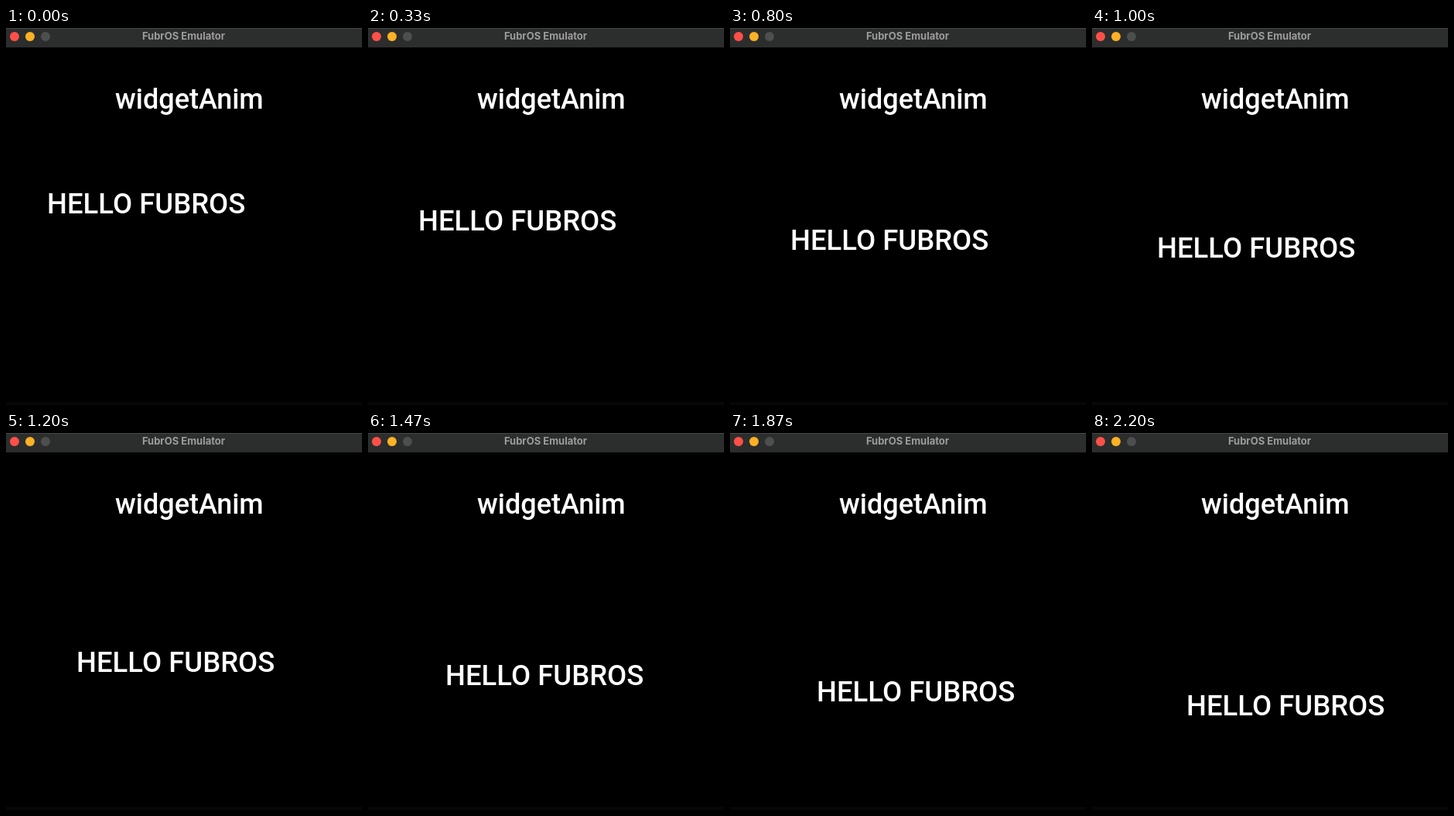
Recreate the animation shown at these times as an HTML page. Size 460 by 486 pixels, loop 2340 ms.

```html
<!DOCTYPE html>
<html lang="en">
<head>
<meta charset="utf-8">
<title>Text animation</title>
<style>
  html, body { margin: 0; width: 100%; height: 100%; overflow: hidden; background: #000; }
  svg { display: block; }
  .label { font: 500 36px Roboto, sans-serif; fill: #fff; }
  #hello { font-size: 36.5px; }
  .title { font: 700 13px Inter, sans-serif; fill: #9c9c9c; text-anchor: middle; }
</style>
</head>
<body>
<svg width="460" height="486" viewBox="0 0 460 486">
  <rect width="460" height="486"/>
  <rect y="482" width="460" height="4" fill="#070707"/>
  <rect width="460" height="25" fill="#2c2e2d"/>
  <rect width="460" height="1" fill="#444645"/>
  <circle cx="11" cy="11" r="6" fill="#fe5048"/>
  <circle cx="31" cy="11" r="6" fill="#fdb125"/>
  <circle cx="51" cy="11" r="6" fill="#4d4e4e"/>
  <text class="title" x="229.5" y="15">FubrOS Emulator</text>
  <text class="label" x="141" y="104">widgetAnim</text>
  <text class="label" id="hello" x="53" y="239">HELLO FUBROS</text>
</svg>
<script>
const LOOP = 2340, STEP = 200 / 3, LAST = 33;
// [step, distance down]: nearly linear, with one short pause
const path = [[0, 0], [5, 22], [8, 31], [12, 47], [15, 57], [16, 60],
              [22, 86], [24, 92], [25, 92], [28, 107], [33, 125]];
const hello = document.getElementById('hello');

function drop(step) {
  const i = Math.max(1, path.findIndex(p => p[0] >= step));
  const [s0, y0] = path[i - 1], [s1, y1] = path[i];
  return Math.round(y0 + (y1 - y0) * (step - s0) / (s1 - s0));
}

function draw() {
  const t = performance.now() % LOOP;
  const y = drop(Math.min(LAST, Math.floor((t + 5) / STEP)));
  const x = Math.floor(y * 0.553);
  hello.setAttribute('transform', `translate(${x} ${y})`);
  requestAnimationFrame(draw);
}
draw();
</script>
</body>
</html>
```
